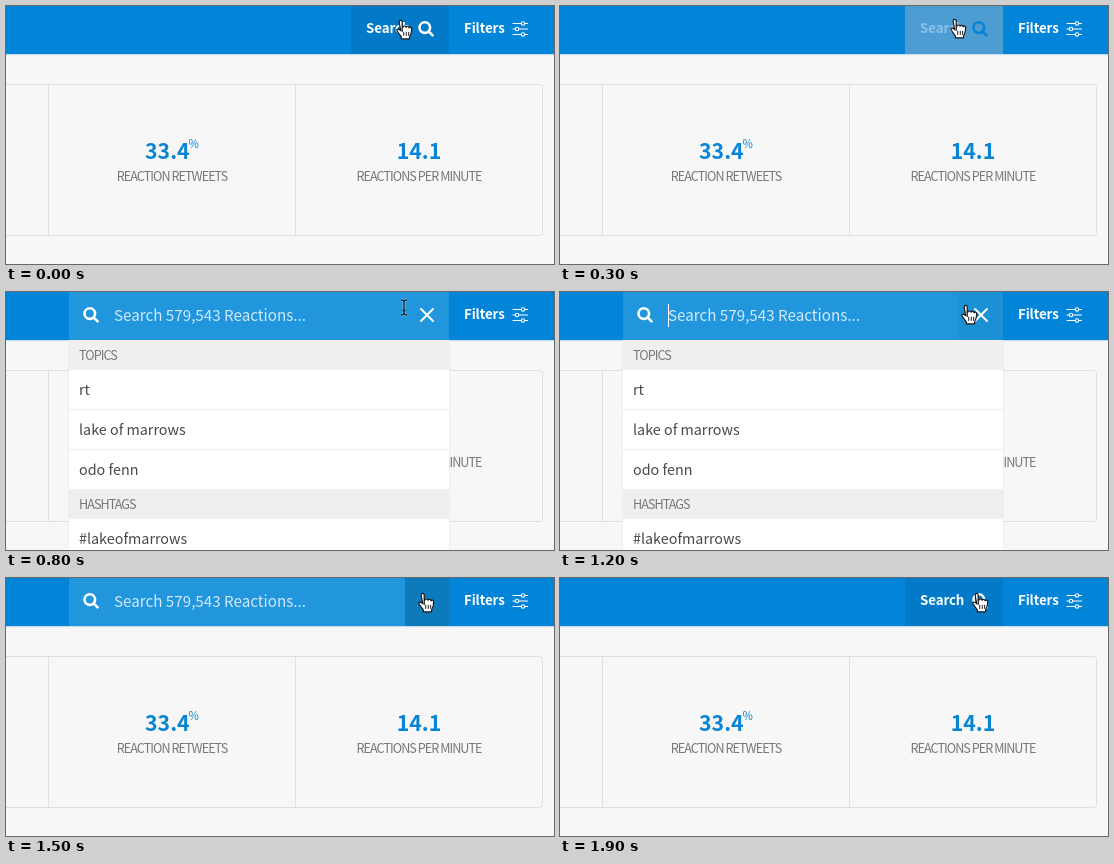
Write an HTML page that moves like this. It is 548 px wide and 258 px high and loops after 2000 ms.

```html
<!DOCTYPE html>
<html lang="en">
<head>
<meta charset="utf-8">
<title>Search bar</title>
<style>
html, body { margin: 0; width: 100%; height: 100%; overflow: hidden; background: #f7f7f7; }
svg { display: block; width: 548px; height: 258px; }
text { font-family: "Noto Sans CJK SC", "Noto Sans CJK JP", "Noto Sans", sans-serif; }
.nav { font-weight: 700; font-size: 13.3px; letter-spacing: -.1px; fill: #fff; }
.num { font-weight: 700; font-size: 21.3px; fill: #0784d4; }
.unit { font-weight: 500; font-size: 11.3px; fill: #0784d4; }
.cap { font-size: 12.6px; letter-spacing: -.95px; fill: #777; }
.row { font-size: 14.35px; fill: #484848; }
.hint { font-size: 15.2px; fill: #d3eafa; }
.line { fill: none; stroke: #dfdfdf; }
.icon { fill: none; stroke: #fff; stroke-linecap: round; }
</style>
</head>
<body>
<svg viewBox="0 0 548 258">
  <defs>
    <g id="lens"><circle cx="-1.2" cy="-1.4" r="5.3"/><path d="M2.8 2.6 L6.6 6.4"/></g>
    <path id="beamShape" d="M-3 -7Q0 -7 0 -5Q0 -7 3 -7M0 -5V6M-3 8Q0 8 0 6Q0 8 3 8M-1.5 3.5H1.5"/>
  </defs>
  <rect width="548" height="258" fill="#f7f7f7"/>
  <rect y="48" width="548" height="1" fill="#c4dcec"/>
  <rect y="49" width="548" height="1" fill="#f1f3f4"/>
  <rect width="548" height="48" fill="#0284d9"/>

  <rect class="line" x="-8.5" y="78.5" width="545" height="151" rx="3"/>
  <path class="line" d="M42.5 78V230M289.5 78V230"/>
  <text class="num" x="139" y="152.5">33.4</text>
  <text class="unit" x="182.5" y="142">%</text>
  <text class="num" x="413" y="152.5" text-anchor="middle">14.1</text>
  <text class="cap" x="166" y="175" text-anchor="middle">REACTION RETWEETS</text>
  <text class="cap" x="413" y="175" text-anchor="middle">REACTIONS PER MINUTE</text>

  <text class="nav" x="458" y="27">Filters</text>
  <g class="icon" stroke-width="1.1">
    <path d="M507 17.5H515M519 17.5H521.5M507 23H509M513 23H521.5M507 28.5H515M519 28.5H521.5"/>
    <circle cx="517" cy="17.5" r="1.7"/><circle cx="511" cy="23" r="1.7"/><circle cx="517" cy="28.5" r="1.7"/>
  </g>

  <g id="button">
    <rect id="buttonBg" x="345" width="98" height="48"/>
    <text id="label" class="nav" x="360" y="27">Search</text>
    <use id="buttonLens" class="icon" href="#lens" x="420" y="23" stroke-width="2.6"/>
  </g>

  <g id="bar">
    <rect x="63" width="380" height="48" fill="#2196dc"/>
    <rect id="closeBg" x="399" width="44" height="48" fill="#0d7abb"/>
    <use id="barLens" class="icon" href="#lens" x="85" y="23" stroke-width="2.6"/>
    <text class="hint" x="108" y="29">Search 579,543 Reactions...</text>
    <path id="caret" d="M108.5 12V35" stroke="#fff"/>
    <path id="cross" class="icon" stroke-width="2" d="M415 17L427 29M427 17L415 29"/>
  </g>

  <g id="panel">
    <rect x="62.5" y="48" width="381" height="212" fill="#e8e8e8"/>
    <rect x="63" y="48" width="380" height="212" fill="#fff"/>
    <path d="M63 48H443V78H63ZM63 197H443V227H63Z" fill="#efefef"/>
    <path d="M63 117.5H443M63 157.5H443" stroke="#ececec"/>
    <text class="cap" x="73" y="68">TOPICS</text>
    <text class="row" x="73" y="103">rt</text>
    <text class="row" x="73" y="143">lake of marrows</text>
    <text class="row" x="73" y="183">odo fenn</text>
    <text class="cap" x="73" y="217">HASHTAGS</text>
    <text class="row" x="73" y="252">#lakeofmarrows</text>
  </g>

  <g id="hand" stroke="#151515" stroke-linejoin="round" stroke-linecap="round">
    <path fill="#fff" stroke-width="1.1" d="M-2.6 2.2V-6.4C-2.6 -8.4 -5.4 -8.4 -5.4 -6.4
      C-5.2 -4 -4.4 -1.6 -4 1.6C-5.2 .2 -7.6 -.6 -7.6 1.2C-6.6 3 -5 5.4 -3.4 7.2V9.2H4.2V7.4
      C5.8 5 6.2 2.6 6.2 -.4C6.2 -2 4.2 -2.2 3.8 -1C3.8 -2.8 1.4 -3 1 -1.6C.6 -3.2 -1.8 -3.2 -2 -1.6"/>
    <path fill="none" stroke-width=".9" d="M-1.2 3V6M1.2 3V6M3.4 3V6"/>
  </g>
  <g id="beam" fill="none" transform="translate(398 15)">
    <use href="#beamShape" stroke="#fff" stroke-opacity=".35" stroke-width="3"/>
    <use href="#beamShape" stroke="#1c2b36" stroke-width="1.4"/>
  </g>
</svg>
<script>
const LOOP = 2000, STEP = 100;
const $ = id => document.getElementById(id);
const set = (id, name, value) => $(id).setAttribute(name, value);
const show = (id, on) => set(id, "visibility", on ? "visible" : "hidden");
const ramp = (t, a, b) => Math.min(1, Math.max(0, (t - a) / (b - a)));
const mix = (a, b, k) => `rgb(${a.map((v, i) => Math.round(v + (b[i] - v) * k))})`;

const WHITE = [255, 255, 255], BLUE = [5, 132, 214];
const HOVER = [2, 122, 199], PRESSED = [77, 157, 211], FADED = [139, 193, 230];

function handPos(t) {
  if (t < 400) return [399, 23 - ramp(t, 100, 300)];
  return [399 + 22 * ramp(t, 1000, 1400), 18 + 6 * ramp(t, 1000, 1300)];
}

function draw(t) {
  const open = t >= 400 && t < 1600;
  const listed = open && t < 1500;
  const press = t < 400 ? ramp(t, 100, 300) : 0;
  show("button", !open);
  set("buttonBg", "fill", mix(HOVER, PRESSED, press));
  set("label", "style", `fill:${mix(WHITE, FADED, press)}`);
  set("buttonLens", "style", `stroke:${mix(WHITE, BLUE, press)}`);

  show("bar", open);
  show("panel", listed);
  show("cross", listed);
  show("caret", listed && (t < 700 || t >= 1100));
  set("barLens", "opacity", 0.2 + 0.8 * ramp(t, 400, 600));
  set("closeBg", "opacity", ramp(t, 1100, 1400) ** 1.4);

  const typing = t >= 400 && t < 1100;
  show("beam", typing);
  show("hand", !typing);
  set("hand", "transform", `translate(${handPos(t)}) scale(1.08)`);
}

function tick(now) {
  draw(Math.floor(now % LOOP / STEP) * STEP);
  requestAnimationFrame(tick);
}
draw(0);
requestAnimationFrame(tick);
</script>
</body>
</html>
```
